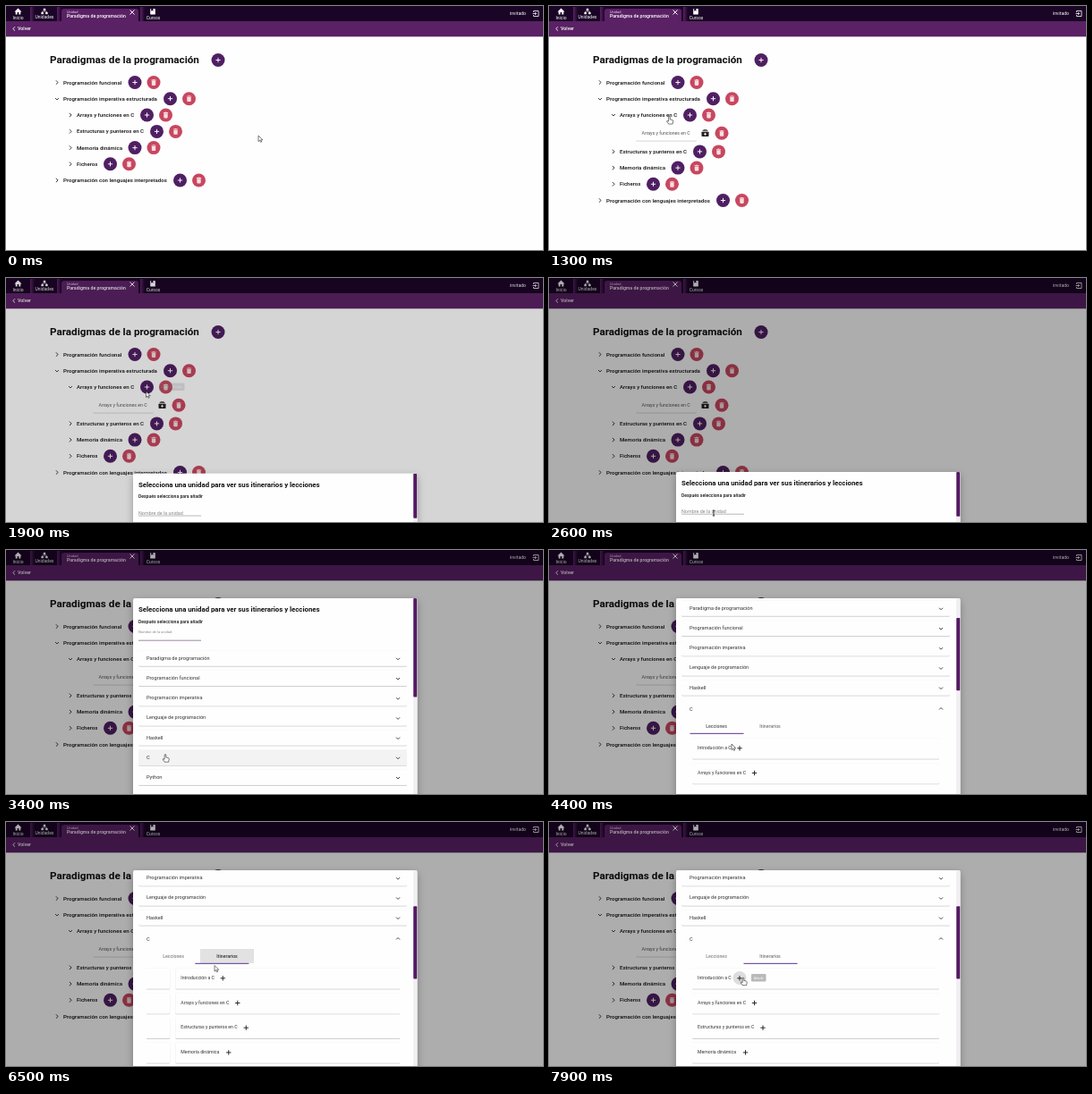
These frames come from a looping animation (600 by 273 pixels, 8000 ms). An HTML page:

```html
<!DOCTYPE html>
<html lang="es">
<head>
<meta charset="utf-8">
<style>
html, body { margin: 0; width: 100%; height: 100%; overflow: hidden; background: #fefefe; }
svg { display: block; }
text { font-family: Roboto, sans-serif; white-space: pre; }
</style>
</head>
<body>
<svg id="stage" width="600" height="273" viewBox="0 0 600 273"></svg>
<script>
const LOOP = 8000, SHEET_TOP = 54, TRACK = 219, VIEW = 208, ROW = 22.2, BODY = 148;
const PURPLE = '#4f1f63', RED = '#c8475f', INK = '#7653a6';

// Markup helpers: y is always the vertical centre
const text = (x, y, s, size = 6.1, fill = '#111', weight = 500, anchor = 'start') =>
  `<text x="${x}" y="${y + size * .33}" font-size="${size}" fill="${fill}" font-weight="${weight}" text-anchor="${anchor}">${s}</text>`;
const rect = (x, y, w, h, fill, more = '') =>
  `<rect x="${x}" y="${y}" width="${w}" height="${h}" fill="${fill}" ${more}/>`;
const line = (d, color = '#222', width = 1, more = '') =>
  `<path d="${d}" fill="none" stroke="${color}" stroke-width="${width}" ${more}/>`;
const shape = (d, fill = '#fff', more = '') => `<path d="${d}" fill="${fill}" ${more}/>`;
const group = (id, content, more = '') => `<g id="${id}" ${more}>${content}</g>`;
const at = (x, y, content) => `<g transform="translate(${x} ${y})">${content}</g>`;
const plus = (x, y, color, r = 2.6) => line(`M${x - r} ${y}h${2 * r}M${x} ${y - r}v${2 * r}`, color, .95);
const chevronRight = (x, y, color = '#222') => line(`M${x - 1.1} ${y - 2.2}l2.2 2.2-2.2 2.2`, color, .9);
const chevronDown = (x, y) => line(`M${x - 2} ${y - 1}l2 2 2-2`, '#333', .9);
const card = (x, y, w, h) => rect(x, y, w, h, '#fefefe', 'rx="1.5" filter="url(#shadow)"');

const addButton = (x, y) => `<circle cx="${x}" cy="${y}" r="7.5" fill="${PURPLE}"/>` + plus(x, y, '#fff');
const trashButton = (x, y) => `<circle cx="${x}" cy="${y}" r="7.5" fill="${RED}"/>` +
  at(x, y, shape('M-2.6-2.9h1.5l.5-.5h1.2l.5.5h1.5v.8h-5.2zM-2.2-1.7h4.4v4.3q0 .8-.8.8h-2.8q-.8 0-.8-.8z', '#f6dfe3'));
const treeRow = (x, y, label, buttonX) =>
  text(x, y, label) + addButton(buttonX, y) + trashButton(buttonX + 21, y);

const header = () =>
  rect(0, 0, 600, 17, '#1b0526') + rect(0, 17, 600, 17.3, '#5a2165') +
  [27, 57, 150].map(x => rect(x, 1, 5, 16, 'url(#edge)')).join('') +
  shape('M62 17V6q0-3 3-3h80q3 0 3 3v11z', '#5a2165') +
  at(13.5, 6, shape('M-4 .4L0-3.6 4 .4H2.8V3.4H.9V1H-.9V3.4H-2.8V.4z')) + text(13.5, 13, 'Inicio', 5, '#fff', 400, 'middle') +
  at(43, 6, rect(-1.2, -3.2, 2.4, 2.2, '#fff') + rect(-3.6, 1, 2.4, 2.2, '#fff') + rect(1.2, 1, 2.4, 2.2, '#fff') +
    line('M0-1V0M-2.4 1V0H2.4V1', '#fff', .6)) + text(43, 12.7, 'Unidades', 5, '#fff', 400, 'middle') +
  text(68, 6.5, 'Unidad', 4, '#e9dcec', 400) + text(68, 11.3, 'Paradigma de programación', 5.2, '#fff') +
  line('M138.5 4.5l5 5m0-5l-5 5', '#fff', 1) +
  at(164, 6.3, rect(-2.8, -3.3, 5.6, 6.6, '#fff', 'rx=".7"') + shape('M-1.8-3.3h2.2v2.8l-1.1-.7-1.1.7z', '#1b0526')) +
  text(164.5, 13, 'Cursos', 5, '#fff', 400, 'middle') +
  text(563, 8.3, 'invitado', 5.1, '#fff', 400) +
  line('M589.5 7V5.5h5.5v6h-5.5V10M588.5 8.5h4m-1.4-1.5l1.5 1.5-1.5 1.5', '#fff', .8) +
  line('M10 23.3l-2.2 2.2 2.2 2.2', '#fff', .9) + text(13, 25.6, 'Volver', 5.3, '#fff');

const tree = () =>
  text(49, 59.8, 'Paradigmas de la programación', 11.7, '#111', 600) + addButton(237, 60.5) +
  chevronRight(57, 85.5) + treeRow(64, 85.5, 'Programación funcional', 144) +
  chevronDown(57, 104) + treeRow(64, 103.7, 'Programación imperativa estructurada', 183.5) +
  group('closedArrow', chevronRight(72, 122)) + group('openArrow', chevronDown(72, 122)) +
  treeRow(79, 122, 'Arrays y funciones en C', 157.5) +
  group('lesson', card(97, 134, 68, 16.5) + text(103.5, 142.2, 'Arrays y funciones en C', 5.2, '#555', 400) +
    at(174.5, 142.3, rect(-4, -1.6, 8, 5.2, '#222', 'rx=".6"') + rect(-3, -3, 6, .8, '#222') + rect(-2, -4.2, 4, .7, '#222') +
      plus(0, 1, '#fff', 1.4)) + trashButton(193, 142.3)) +
  group('below',
    [['Estructuras y punteros en C', 168.5], ['Memoria dinámica', 144], ['Ficheros', 116.5]].map(([label, x], i) =>
      chevronRight(72, 140.4 + 18.2 * i) + treeRow(79, 140.4 + 18.2 * i, label, x)).join('') +
    chevronRight(57, 195) + treeRow(64, 195, 'Programación con lenguajes interpretados', 194.5));

const panel = (y, label, id) => card(148, y - 8.5, 300, 17.3) +
  (id ? rect(148, y - 8.5, 300, 17.3, '#f3f3f3', `id="${id}"`) : '') +
  text(157, y, label, 5.6, '#333', 400) + (label && chevronDown(438, y + .8));

const lessons = ['Introducción a C', 'Arrays y funciones en C', 'Estructuras y punteros en C', 'Memoria dinámica'];
const plusX = [213, 229.5, 239, 219.5];
const lessonCards = () => lessons.map((label, i) => {
  const y = 223.5 + 27.7 * i;
  return card(160, y - 11, 276, 23) + text(166, y - .2, label, 5.2, '#333', 400) +
    (i ? '' : `<circle class="hover" cx="213" cy="${y}" r="7.5" fill="#ddd"/>`) + plus(plusX[i], y + .3, '#222', 2.7);
}).join('');

const sheetContent = () =>
  text(148, 12.6, 'Selecciona una unidad para ver sus itinerarios y lecciones', 7.8, '#111', 600) +
  text(148, 26, 'Después selecciona para añadir', 5.05) +
  group('label', text(0, 0, 'Nombre de la unidad', 5.4, '#888', 400)) +
  line('M148 47.2h70', '#777', .6, 'id="underline"') +
  group('panels',
    ['Paradigma de programación', 'Programación funcional', 'Programación imperativa', 'Lenguaje de programación', 'Haskell']
      .map((label, i) => panel(67 + ROW * i, label)).join('') +
    group('closedC', panel(178, 'C', 'hoverC')) +
    group('openC', rect(148, 169, 300, 20, '#fefefe', 'id="body" rx="1.5" filter="url(#shadow)"') +
      text(157, 179.8, 'C', 5.6, '#333', 400) + line('M436 180.5l2-2 2 2', '#333', .9) +
      group('tabs',
        rect(217, 191, 60, 16, '#e2e2e2', 'id="tabHover"') +
        group('tabOne', text(187, 199.3, 'Lecciones', 5.2, '#555', 500, 'middle')) +
        group('tabTwo', text(247, 199.3, 'Itinerarios', 5.2, '#333', 500, 'middle')) +
        rect(157.5, 206.8, 60, 1.2, INK, 'id="inkBar"') +
        `<g clip-path="url(#tabClip)">${group('pageOne', lessonCards())}${group('pageTwo', lessonCards())}</g>`,
        'clip-path="url(#bodyClip)"')) +
    group('after', panel(178 + ROW, 'Python') + panel(178 + 2 * ROW, '')));

const tooltip = (id, x, y, w, h, label, size) =>
  group(id, rect(x, y, w, h, '#777', 'rx="1"') + text(x + w / 2, y + h / 2, label, size, '#fff', 400, 'middle'));

const clip = (id, x, y, w, h, more = '') => `<clipPath id="${id}">${rect(x, y, w, h, '#000', more)}</clipPath>`;
const outline = 'stroke="#222" stroke-width=".6" stroke-linejoin="round"';

stage.innerHTML = `<defs>
  <filter id="shadow" x="-5%" y="-20%" width="110%" height="160%"><feDropShadow dx="0" dy=".5" stdDeviation=".6" flood-opacity=".36"/></filter>
  <filter id="glow" x="-10%" y="-10%" width="120%" height="120%"><feDropShadow dx="0" dy="3" stdDeviation="4" flood-opacity=".3"/></filter>
  <linearGradient id="edge"><stop stop-color="#5a2165"/><stop offset="1" stop-color="#1b0526"/></linearGradient>
  ${clip('sheetClip', 142, 0, 317.5, 273, 'rx="2"')}${clip('tabClip', 157, 209, 283, 140)}${clip('bodyClip', 148, 189, 300, 0, 'id="bodyHeight"')}
  </defs>` +
  rect(0, 0, 600, 273, '#fefefe') + tree() + header() +
  tooltip('blockTip', 171, 117.5, 28.5, 8.5, 'Añadir bloque', 3.8) +
  rect(0, 0, 600, 273, '#000', 'id="backdrop"') +
  group('sheet', rect(142, 0, 317.5, 280, '#fefefe', 'rx="2" filter="url(#glow)"') +
    `<g clip-path="url(#sheetClip)">${group('scroller', sheetContent())}
    ${rect(455, 0, 4.5, 280, '#f1eff2')}${rect(455.2, 0, 4.2, 20, '#551a63', 'id="thumb" rx="1"')}</g>`) +
  tooltip('addTip', 226, 170, 16.5, 8.5, 'Añadir', 3.8) +
  group('pointer',
    group('arrow', shape('M0 0V6.6L1.6 5.2 2.6 7.4 3.7 6.9 2.7 4.8H4.7z', '#fff', outline)) +
    group('hand', shape('M-.8 0Q0-1 .8 0V3L3.6 3.7Q4.4 4 4.2 5L3.6 8.2H-.8L-3 5Q-2.4 3.9-.8 5.2z', '#fff', outline)) +
    group('beam', line('M-1.2-3h2.4M0-3v6M-1.2 3h2.4', '#111', .8)));

const $ = id => document.getElementById(id);
const span = (t, a, b) => Math.min(1, Math.max(0, (t - a) / (b - a)));
const smooth = p => p * p * (3 - 2 * p);
const easeOut = p => 1 - (1 - p) ** 3;
const mix = (a, b, p) => a + (b - a) * p;
const within = (t, ...ranges) => ranges.some(([a, b]) => t >= a && t < b);
const show = (id, opacity) => $(id).setAttribute('opacity', +opacity);
const move = (id, x, y, scale = 1) => $(id).setAttribute('transform', `translate(${x} ${y}) scale(${scale})`);

// cubic-bezier(.35, 0, .25, 1)
function tabEase(p) {
  let lo = 0, hi = 1;
  for (let i = 0; i < 20; i++) {
    const s = (lo + hi) / 2;
    const x = 1.05 * s * (1 - s) ** 2 + .75 * s * s * (1 - s) + s ** 3;
    if (x < p) lo = s; else hi = s;
  }
  return smooth(lo);
}

// time, x, y
const route = [[100, 282, 145], [850, 72, 122], [1000, 72, 122], [1450, 156, 124.5], [1850, 156, 124.5], [2500, 184, 263],
  [2800, 184, 263], [3350, 178, 229], [3700, 178, 229], [4350, 204, 217], [4600, 204, 217], [5400, 221, 175],
  [5500, 221, 175], [5700, 237, 172], [5900, 237, 172], [6080, 243, 153], [6220, 243, 153], [6450, 233, 160.5],
  [6800, 233, 160.5], [7200, 217, 174.5], [LOOP, 217, 174.5]];

function pointerAt(t) {
  const i = route.findIndex(k => k[0] >= t);
  if (i < 1) return route[0].slice(1);
  const [t0, x0, y0] = route[i - 1], [t1, x1, y1] = route[i];
  const p = smooth(span(t, t0, t1));
  return [mix(x0, x1, p), mix(y0, y1, p)];
}

function draw(t) {
  const unfolded = t >= 1000;
  show('closedArrow', !unfolded);
  show('openArrow', unfolded);
  show('lesson', unfolded);
  move('below', 0, unfolded ? 22.5 : 0);
  show('blockTip', .8 * span(t, 1500, 1650) * (1 - span(t, 1750, 1950)));

  const loaded = t >= 3000;
  const top = loaded ? SHEET_TOP : mix(273, 217, easeOut(span(t, 1765, 1965)));
  show('backdrop', .32 * span(t, 1700, 2100));
  show('sheet', t >= 1765);
  move('sheet', 0, top);
  const floating = span(t, 2800, 2920);
  move('label', 148, mix(44.5, 38, floating), mix(1, .75, floating));
  $('underline').setAttribute('stroke', floating ? '#5a3a66' : '#888');
  show('panels', loaded);

  const opened = smooth(span(t, 3700, 3920)), growth = BODY * opened;
  show('closedC', opened === 0);
  show('openC', opened > 0);
  show('hoverC', within(t, [3250, 3700]));
  $('body').setAttribute('height', 20 + growth);
  $('bodyHeight').setAttribute('height', growth);
  move('after', 0, growth + 4 * opened);

  const scroll = 56 * smooth(span(t, 3950, 4350)) + 47 * smooth(span(t, 4600, 5100));
  const scale = loaded ? TRACK / (412 + growth) : .89;
  $('thumb').setAttribute('y', scroll * scale);
  $('thumb').setAttribute('height', scale * (loaded ? VIEW : 56));
  move('scroller', 0, -scroll);

  const slide = tabEase(span(t, 6180, 6680));
  move('pageOne', -282 * slide, 0);
  move('pageTwo', 282 * (1 - slide), 0);
  $('inkBar').setAttribute('x', 157.5 + 60 * slide);
  show('tabHover', span(t, 5980, 6100) * (1 - span(t, 6550, 6700)));
  show('tabOne', mix(1, .7, slide));
  show('tabTwo', within(t, [6100, 6600]) ? 1 : .65);

  document.querySelectorAll('.hover').forEach(c => c.setAttribute('opacity', +(t >= 7150)));
  show('addTip', .5 * span(t, 7750, 7900));

  const hand = within(t, [820, 1900], [3250, 3800], [6000, 6300], [7130, LOOP]), beam = within(t, [2400, 3000]);
  show('hand', hand);
  show('beam', beam);
  show('arrow', !hand && !beam);
  move('pointer', ...pointerAt(t));
}

function tick() {
  draw(performance.now() % LOOP);
  requestAnimationFrame(tick);
}
tick();
</script>
</body>
</html>
```
